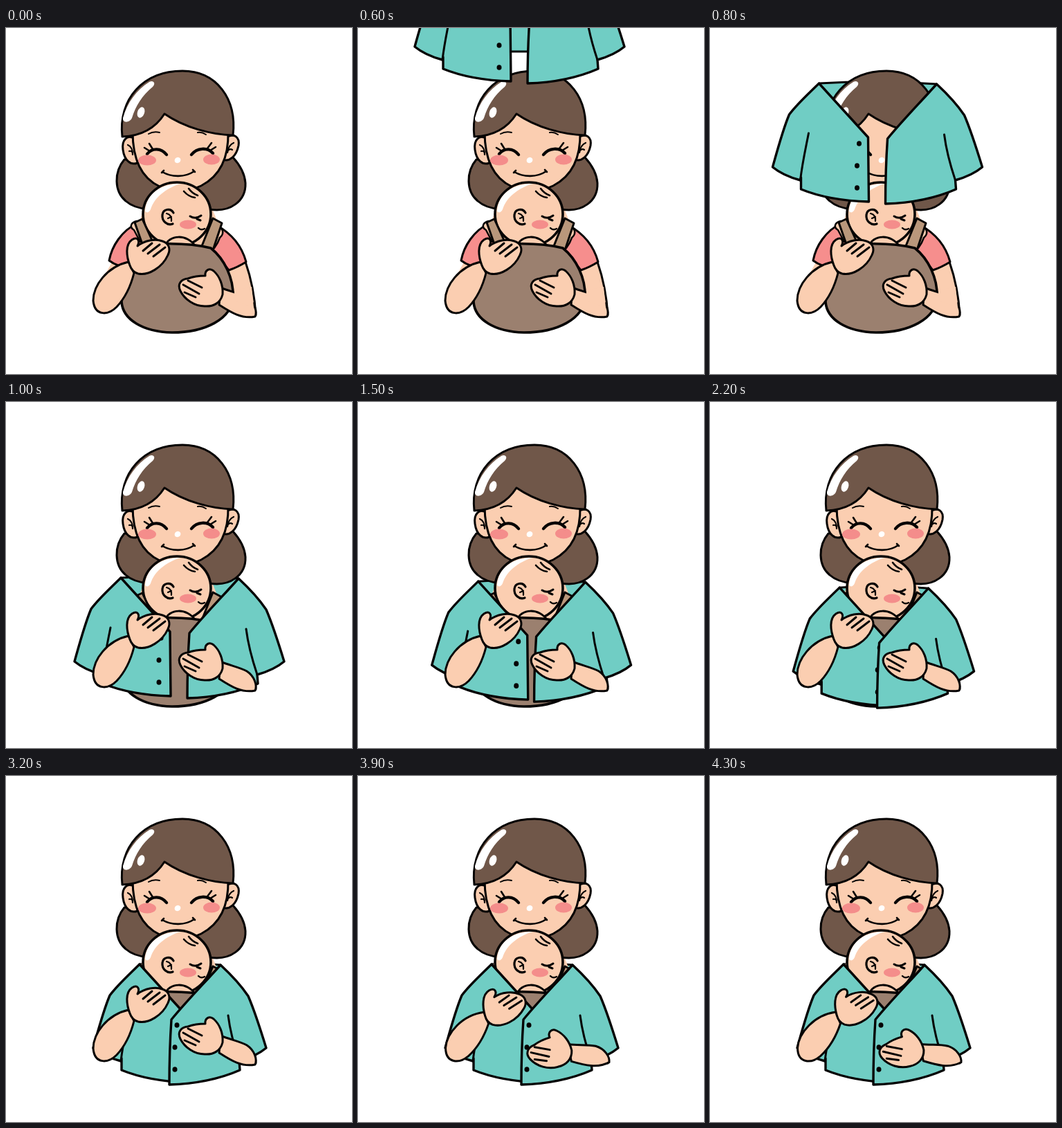
Animation, 500 px wide and 500 px high, one loop 4.8 s. Source, as an HTML page with a canvas:

```html
<!DOCTYPE html>
<html lang="en">
<head>
<meta charset="utf-8">
<title>Mother and baby</title>
<style>
html, body { margin: 0; width: 100%; height: 100%; overflow: hidden; background: #fff; }
canvas { display: block; width: 100vmin; height: 100vmin; }
</style>
</head>
<body>
<canvas id="stage"></canvas>
<script>
const canvas = document.getElementById('stage');
const ctx = canvas.getContext('2d');
const LOOP = 4800, STEP = 100;
const INK = '#050303', HAIR = '#705749', SKIN = '#fbceb1', BLUSH = '#f48d8b',
      PINK = '#f68e8d', BROWN = '#9b806f', STRAP = '#b9977b', TEAL = '#70cdc4', WHITE = '#fff';

const clamp = v => Math.max(0, Math.min(1, v));
const ramp = (t, a, b) => clamp((t - a) / (b - a));

function shape(d, fill, width = 3) {
  const p = new Path2D(d);
  if (fill) { ctx.fillStyle = fill; ctx.fill(p); }
  if (width) { ctx.lineWidth = width; ctx.strokeStyle = INK; ctx.stroke(p); }
}
const line = (d, width = 3) => shape(d, null, width);

function oval(x, y, rx, ry, fill, turn = 0, width = 0) {
  ctx.beginPath();
  ctx.ellipse(x, y, rx, ry, turn, 0, Math.PI * 2);
  ctx.fillStyle = fill;
  ctx.fill();
  if (width) { ctx.lineWidth = width; ctx.strokeStyle = INK; ctx.stroke(); }
}

function moved(dx, dy, draw) {
  ctx.save();
  ctx.translate(dx, dy);
  draw();
  ctx.restore();
}

function turned(x, y, degrees, draw) {
  ctx.save();
  ctx.translate(x, y);
  ctx.rotate(degrees * Math.PI / 180);
  ctx.translate(-x, -y);
  draw();
  ctx.restore();
}

const button = (x, y) => oval(x, y, 3.5, 3.8, INK);

function torso() {
  // neck and chest
  shape('M207 240 L290 240 L310 292 L300 330 L196 330 L190 288 Z', SKIN, 0);
  // upper arms
  shape('M154 337 L140 362 L160 390 L184 350 Z', SKIN, 0);
  shape('M319 349 L346 338 C353 358 359 382 361 415 L335 412 L313 385 Z', SKIN);
  // sleeves
  shape('M190 282 C167 293 153 315 149 336 C158 343 169 346 181 348 L206 316 Z', PINK);
  shape('M304 285 C326 297 341 316 347 338 C339 343 331 347 322 350 L296 317 Z', PINK);
  shape('M189 279 C180 281 178 288 185 292 L194 309 L203 300 Z', SKIN, 2.5);
  shape('M303 285 C313 288 317 296 309 303 C307 309 304 314 301 318 L292 305 Z', SKIN, 2.5);
}

function momHead() {
  // back hair
  shape('M171 190 C156 208 156 236 173 250 C182 258 194 261 206 262 L294 262 ' +
        'C324 267 347 250 346 224 C345 210 338 198 328 187 Z', HAIR);
  // ears
  shape('M186 160 C175 153 167 162 169 176 C171 191 180 199 190 195 Z', SKIN);
  shape('M318 158 C330 151 338 158 336 170 C333 185 323 194 313 190 Z', SKIN);
  line('M176 169 C181 171 183 176 183 183 M178 178 Q181 177 183 180', 2.2);
  line('M329 166 C324 168 321 173 320 180 M327 176 Q324 174 321 177', 2.2);
  // face
  shape('M183 150 C183 188 194 216 222 229 C240 236 266 236 282 228 ' +
        'C309 214 322 187 321 150 L228 115 Z', SKIN);
  // front hair
  shape('M168 157 C162 103 198 62 255 62 C304 62 334 102 328 155 ' +
        'C296 154 258 144 229 124 C217 143 198 156 168 157 Z', HAIR);
  shape('M169 130 C175 108 189 89 207 78 C213 75 217 80 212 85 ' +
        'C197 97 187 113 182 130 C179 137 168 138 169 130 Z', WHITE, 0);
  oval(195, 122, 5, 8, WHITE, 0.35);
  // eyes and brows
  line('M204 182 C211 173 224 173 232 183', 4.4);
  line('M268 183 C276 173 291 172 299 181', 4.4);
  line('M200 173 L208 178 M207 167 L212 175 M303 172 L295 177 M297 166 L291 174', 2.6);
  line('M206 153 Q213 149 222 151 M277 151 Q283 150 289 154', 2);
  oval(204, 191, 13, 7.5, BLUSH);
  oval(297, 190, 12, 7.5, BLUSH);
  oval(248, 191, 4.5, 4, WHITE, -0.5);
  line('M226 208 C239 216 259 216 272 207 M225 209 L228 206 M270 205 L273 208', 2.6);
}

function baby() {
  oval(247, 269, 49, 46, SKIN, 0, 3.6);
  shape('M201 264 C203 241 222 225 252 225 C231 232 215 244 209 262 C207 267 202 268 201 264 Z', WHITE, 0);
  line('M257 236 Q264 244 273 245 M264 232 Q269 239 277 242', 2.6);
  // ear
  line('M242 267 C238 260 227 261 226 270 C225 279 233 286 241 283', 3.2);
  line('M232 268 Q240 270 239 279 M234 275 L239 273', 2.2);
  // face
  line('M266 272 Q274 277 282 271 M276 276 L281 278', 3);
  line('M278 289 Q282 293 287 290', 2.4);
  oval(263, 284, 12, 6.5, BLUSH);
  shape('M230 316 C234 298 263 297 274 316 Z', SKIN, 3);
}

function carrier() {
  shape('M186 281 L197 276 L213 311 L199 318 Z', STRAP);
  shape('M299 275 L312 282 L299 321 L283 315 Z', STRAP);
  shape('M205 313 C232 311 268 311 296 318 C316 334 329 362 328 388 ' +
        'C327 421 287 440 240 440 C197 439 169 421 167 396 C167 376 177 362 182 346 Z', BROWN, 3.6);
}

function shirtBack(open) {
  const left = 193 - 27 * open, right = 310 + 26 * open;
  shape(`M${left} 272 Q250 267 ${right} 273 L300 400 L200 400 Z`, TEAL);
}

function leftPanel() {
  shape('M193 272 L264 350 L265 443 C229 442 194 436 167 425 L167 408 L166 412 ' +
        'C151 408 137 402 126 393 C133 368 141 338 150 317 C162 301 179 286 193 272 Z', TEAL, 3.4);
  line('M178 344 C174 365 169 386 166 412');
  button(251, 359);
  button(248, 391);
  button(248, 423);
}

function rightPanel() {
  shape('M310 273 C324 286 338 300 350 318 C360 341 368 367 376 393 ' +
        'C364 403 351 408 337 412 L338 425 C306 439 270 445 236 446 ' +
        'C236 413 237 382 239 352 C262 324 286 300 310 273 Z', TEAL, 3.4);
  line('M321 346 C324 370 330 391 337 412');
}

function leftArm() {
  shape('M177 338 C146 345 126 372 126 394 C128 416 147 416 160 403 C174 388 181 370 185 354 Z', SKIN);
  shape('M179 343 C174 330 172 313 182 306 C190 301 194 307 190 315 ' +
        'C200 307 216 304 226 308 C236 311 238 320 234 328 C226 346 206 358 191 355 C184 353 181 349 179 343 Z', SKIN);
  line('M198 322 L211 311 M205 326 L222 313 M213 330 L230 317', 3);
}

function rightArm() {
  shape('M310 375 C324 381 337 383 348 389 C360 397 363 410 360 417 C341 421 325 411 308 400 Z', SKIN);
  shape('M288 358 C287 350 294 346 300 351 C309 359 314 372 313 385 ' +
        'C310 397 300 403 287 402 C272 402 258 392 252 380 C247 370 253 363 263 362 C271 359 280 358 288 358 Z', SKIN);
  line('M263 365 L283 375 M256 371 L279 384 M258 382 L274 389', 3);
}

// Hands dip past their resting pose, then settle.
const pat = t => 1.4 * ramp(t, 3600, 4000) - 0.4 * ramp(t, 4000, 4300);

function render(t) {
  ctx.fillStyle = WHITE;
  ctx.fillRect(0, 0, 500, 500);
  const worn = t >= 600;
  const lift = 1 - ramp(t, 600, 1000);
  const open = 1 - ramp(t, 1100, 2500);
  const dx = -17 * lift, dy = -348 * lift - 18 * open;

  if (worn) moved(dx, dy, () => shirtBack(open));
  torso();
  momHead();
  baby();
  carrier();
  if (worn) {
    moved(dx - 27 * open, dy, leftPanel);
    moved(dx + 26 * open, dy, rightPanel);
  }
  if (t >= 3000) button(247, 360);
  if (t >= 3100) button(244, 392);
  if (t >= 3200) button(244, 424);

  const p = pat(t);
  turned(140, 400, 4.5 * p, leftArm);
  turned(350, 405, -16 * p, rightArm);
  // bare elbow has no seam
  if (t < 900) shape('M330 379 L355 374 L358 404 L330 394 Z', SKIN, 0);
}

function resize() {
  const size = Math.min(innerWidth, innerHeight) * (window.devicePixelRatio || 1);
  canvas.width = canvas.height = Math.max(1, Math.round(size));
}

const start = performance.now();
function tick(now) {
  const t = Math.max(0, now - start) % LOOP;
  const k = canvas.width / 500;
  ctx.setTransform(k, 0, 0, k, 0, 0);
  ctx.lineCap = ctx.lineJoin = 'round';
  render(Math.floor(t / STEP) * STEP);
  requestAnimationFrame(tick);
}
addEventListener('resize', resize);
resize();
tick(start);
</script>
</body>
</html>
```
